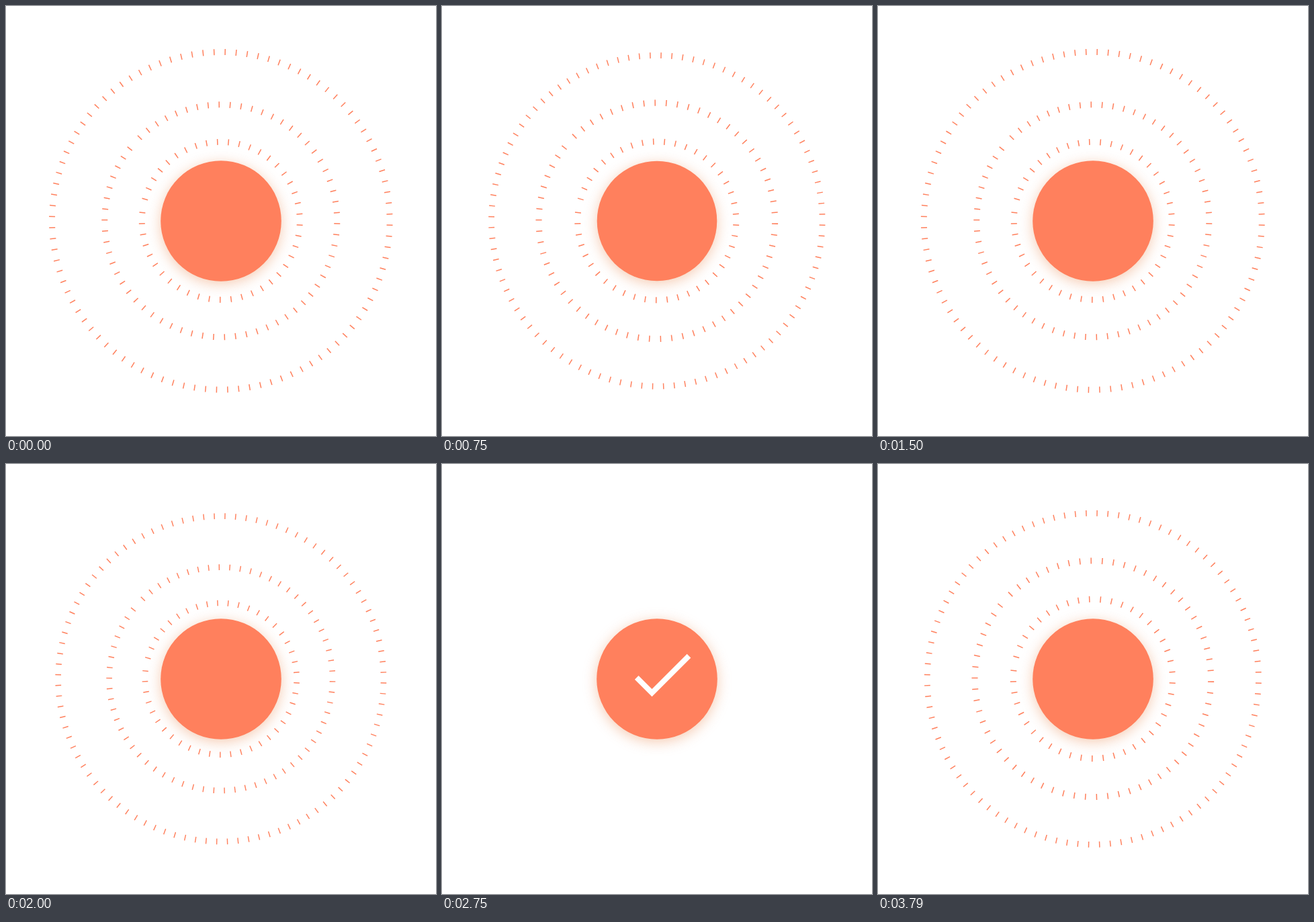
Recreate the animation shown at these times as an HTML page. Size 640x640 px, loop 3.83 s.

```html
<!DOCTYPE html>
<html lang="en">
<head>
<meta charset="utf-8">
<title>Pulse button</title>
<style>
  html, body { margin: 0; width: 100%; height: 100%; overflow: hidden; background: #fff; }
  svg { display: block; width: 100%; height: 100%; }
  #disk { filter: drop-shadow(0 4px 10px rgba(233, 140, 85, .45)); }
</style>
</head>
<body>
<svg viewBox="0 0 640 640">
  <g id="rings" fill="none" stroke="#ff805d" stroke-width="1.5"></g>
  <g id="disk"><circle r="89.8" fill="#ff805d"/></g>
  <path id="check" d="M289.7 317.9L312.5 340.7L367.5 285.7" fill="none" stroke="#fff" stroke-width="8"/>
</svg>
<script>
const LOOP = 3830;
const TICK = 9;
const RINGS = [
  { radius: 117.5, count: 45, first: 195.95, step: 7.955, beat: 0,   fold: 460, grow: 3572 },
  { radius: 173,   count: 66, first: 225.75, step: 5.425, beat: 200, fold: 460, grow: 3397 },
  { radius: 251.3, count: 96, first: 271.45, step: 3.75,  beat: 400, fold: 478, grow: 3260 }
];
const BEAT = [[0, 1], [135, 1.088], [290, .975], [560, 1.016], [820, 1.002], [1300, 1]];
const SETTLE = [[270, 1.055], [510, .981], [760, 1]];

const disk = document.getElementById("disk");
const check = document.getElementById("check");
const checkLength = check.getTotalLength();
const clamp = x => Math.max(0, Math.min(1, x));
const progress = (t, start, duration) => clamp((t - start) / duration);

// Value at t of a track of [time, value] keys joined by cosine easing.
function track(t, keys) {
  if (t <= keys[0][0]) return keys[0][1];
  for (let i = 1; i < keys.length; i++) {
    const [t0, a] = keys[i - 1], [t1, b] = keys[i];
    if (t < t1) return a + (b - a) * (1 - Math.cos(Math.PI * (t - t0) / (t1 - t0))) / 2;
  }
  return keys[keys.length - 1][1];
}

function tickPath({ radius, count, first, step }) {
  let d = "";
  for (let i = 0; i < count; i++) {
    const a = (first + i * step) * Math.PI / 180;
    const at = r => (r * Math.cos(a)).toFixed(2) + " " + (r * Math.sin(a)).toFixed(2);
    d += "M" + at(radius - TICK / 2) + "L" + at(radius + TICK / 2);
  }
  return d;
}

for (const ring of RINGS) {
  ring.node = document.createElementNS("http://www.w3.org/2000/svg", "path");
  ring.node.setAttribute("d", tickPath(ring));
  document.getElementById("rings").append(ring.node);
}

function ringScale(t, { beat, fold, grow }) {
  if (t < 1910) return track(t - beat, BEAT);
  if (t < 3000) return 1 - progress(t, 1910, fold) ** 2;
  const age = t - grow;
  if (age < 270) return 1.055 * Math.sin(clamp(age / 270) * Math.PI / 2);
  return track(age, SETTLE);
}

function diskScale(t) {
  if (t < 170) return track(t, [[0, 1], [170, .96]]);
  return 1 - .04 * (1 - progress(t, 170, 830)) ** 1.6;
}

function checkAmount(t) {
  if (t < 3000) return 1 - (1 - progress(t, 2085, 670)) ** 2.2;
  return track(t, [[3000, 1], [3300, 0]]);
}

function render(t) {
  for (const ring of RINGS) {
    const scale = ringScale(t, ring);
    ring.node.setAttribute("transform", `translate(319.8 319.8) scale(${scale.toFixed(4)})`);
    ring.node.setAttribute("visibility", scale < .01 ? "hidden" : "visible");
  }
  disk.setAttribute("transform", `translate(320 320) scale(${diskScale(t).toFixed(4)})`);
  const drawn = checkAmount(t);
  check.setAttribute("visibility", drawn > .001 ? "visible" : "hidden");
  check.setAttribute("stroke-dasharray", `${drawn * checkLength} ${checkLength + 10}`);
}

const start = performance.now();
function frame() {
  render((performance.now() - start) % LOOP);
  requestAnimationFrame(frame);
}
frame();
</script>
</body>
</html>
```
